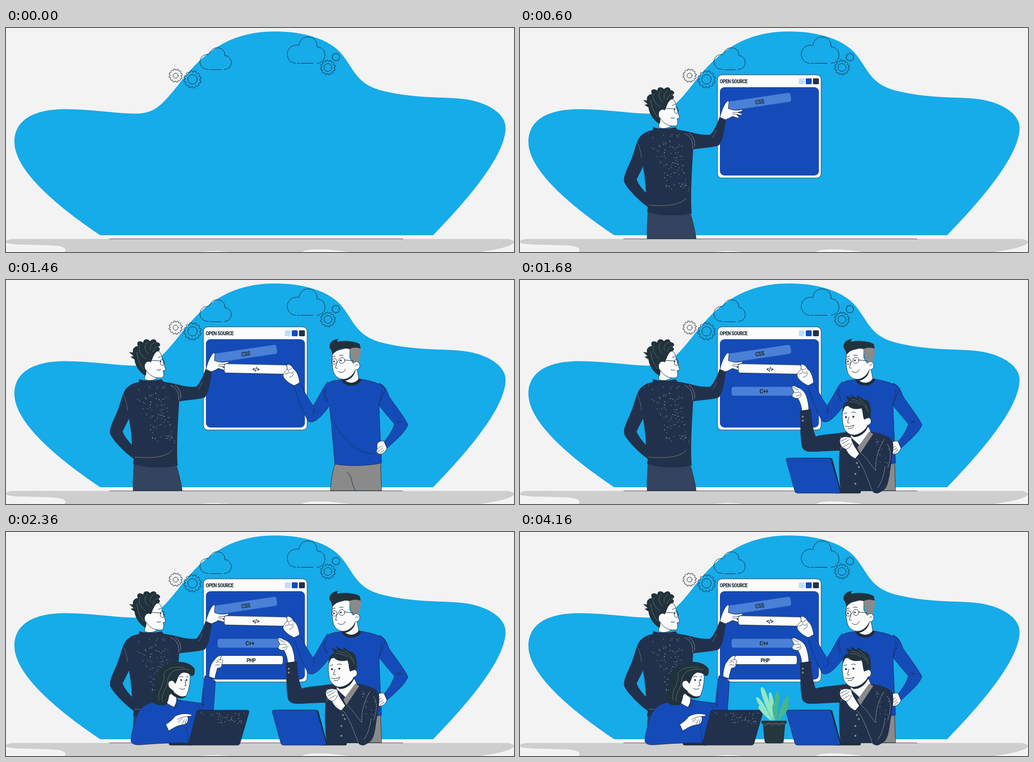
These frames come from a looping animation (1024 px wide and 454 px high, 5040 ms). An HTML page:

```html
<!DOCTYPE html>
<html lang="en">
<head>
<meta charset="utf-8">
<title>Open source team</title>
<style>
  html, body { margin: 0; width: 100%; height: 100%; overflow: hidden; background: #f3f3f3; }
  svg { display: block; width: 100vw; height: 100vh; }
  .step { opacity: 0; }
  .line, .thin { fill: none; stroke: #1f2d3b; stroke-width: 1; stroke-linecap: round; stroke-linejoin: round; }
  .thin { stroke-width: .8; }
  .skin, .card { fill: #fcfcfd; stroke: #1f2d3b; stroke-width: .9; stroke-linejoin: round; }
  .blue { fill: #144bb8; stroke: #1b2c52; stroke-width: .9; stroke-linejoin: round; }
  .navy { fill: #22314b; }
  .hair { fill: #21323c; }
  .ink { fill: #1f2d3b; }
  .grey { fill: #8a8a8a; }
  .bar { fill: #4a80d6; }
  .seam { fill: none; stroke: #c3c7c2; stroke-width: .8; stroke-dasharray: 3 1.2; }
  .speck { fill: none; stroke: #cdd2d0; stroke-width: .8; }
  .strand { fill: none; stroke: #8b9894; stroke-width: .6; }
  text { font-family: "Roboto Condensed", "Liberation Sans Narrow", Roboto, "Liberation Sans", sans-serif;
    font-weight: 700; font-stretch: 75%; letter-spacing: -.06em;
    fill: #22303c; dominant-baseline: central; text-anchor: middle; }
</style>
</head>
<body>
<svg viewBox="0 0 1024 454" preserveAspectRatio="none">
  <g id="scene">
    <path fill="#16abe9" d="M190 420C110 366 17 291 17 231C17 190 50 164.500 120 164.500C180 165 225 174 262 173.500C298 173 311 160 346 117C390 60 440 7 542 7C600 7 651 22 677 53C702 84 706 114 760 127.500C835 146 895 137 940 147C975 155 1007 175 1007 202C1007 255 940 338 861 420Z"/>
    <path fill="#cecece" d="M14 427.500H1010C1018 428 1024 431 1024 434C1020 443 990 449 955 454H690C645 447 606 447 597 454H448C430 451.500 410 451.500 390 454H118C125 446 112 441 88 440.500C50 439 0 440 0 434C0 430 6 428 14 427.500Z"/>
    <path class="line" style="stroke:#4c5658" d="M209 427.500H800"/>
    <path class="line" d="M407 84C398 84 391 77 391 69C391 59 399 52 408 54M410.500 52C413 44 418 40 426 40C435 40 442 47 441 56C449 56 454 63 454 70C454 78 448 84 440 84M410 84.500H412M414 84.500H434"/>
    <path class="line" d="M584 71.500C574 71 567 63 567 53C567 42 577 33 588 35M590 36C592 25 599 18 609 18C620 18 628 27 627 38C637 39 643 46 643 55C643 64 637 71 627 71.500M587 71.500H592M594 71.500H619"/>
  </g>

  <g class="step">
    <rect class="card" x="398" y="95" width="209" height="209" rx="9"/>
    <rect x="403" y="120" width="199.500" height="179" rx="9" fill="#144bb8"/>
    <rect x="562" y="102" width="12" height="12" rx="2" fill="#bfdffa"/>
    <rect x="576" y="102" width="12" height="12" rx="2" fill="#144bb8"/>
    <rect x="590.500" y="102" width="12" height="12" rx="2" class="navy"/>
    <text x="430.500" y="108" data-w="56">OPEN SOURCE</text>
  </g>

  <g class="step" id="left">
    <g transform="rotate(-8.500 483 149)">
      <rect class="bar" x="420" y="140" width="126.500" height="18.500" rx="4.500"/>
      <text x="483" y="149.500" data-w="18">CSS</text>
    </g>
    <path fill="#34445f" d="M258 368C256 390 255 410 256 427H355C353 410 348 392 343 374Z"/>
    <path class="line" d="M256 427H355C353 412 349 395 344 378"/>
    <path class="skin" d="M286 166L279 201C286 205 296 204 303 200L304 185Z"/>
    <path class="skin" d="M291 160C296 147 302 142 309 145C313 150 314 154 315 160L322 182L316.500 184L318 189C318 195 317 198 312 198.500C301 199 291 195 285 186L280 180C277 171 281 164 286 165Z"/>
    <path class="hair" d="M281 194C270 188 260 174 259 161L251 156L257 154L248 146L256 147C254 138 261 134 266 134C261 124 271 122 277 127C276 118 288 119 290 124C297 117 304 121 303 126C310 126 314 132 307 136C312 138 311 144 304 145C298 150 296 158 292 167C284 162 278 170 280 179C283 184 284 189 281 194Z"/>
    <path class="strand" d="M264 145C264 158 270 172 278 181M271 133C264 141 272 153 282 160M284 127C276 136 282 146 288 150M300 126C291 131 288 137 292 143M309 134C302 135 298 139 296 146"/>
    <path class="line" d="M293 163L311 164M304 182Q308 184 312 182M307 157L312 155"/>
    <ellipse class="line" cx="315" cy="167" rx="4" ry="6.500"/>
    <circle class="ink" cx="312" cy="165" r="1.300"/>
    <path class="navy" d="M268 201C281 205 298 205 314 201L317 206C345 210 365 219 384 216C392 206 398 194 402 181L415 186C412 205 410 225 401 238C385 243 365 243 349 246C347 285 343 335 346 376C320 382 280 381 256 373C257 366 258 365 257 362C239 350 214 323 210 312C207 300 219 281 226 262C234 240 236 222 248 215C254 210 261 208 268 207ZM248 281L235 307C239 317 247 327 254 334C253 316 251 298 248 281Z" fill-rule="evenodd"/>
    <path class="thin" d="M268 206C282 210 302 210 317 206"/>
    <path class="seam" style="stroke:#bfae95" d="M260 359C290 361 322 361 336 344"/>
    <path class="seam" d="M332 214C345 219 349 230 348 244M341 213C350 220 353 230 352 241"/>
    <path class="strand" d="M236 232C241 241 244 252 245 264M388 222Q393 216 396 206"/>
    <path class="skin" d="M403 181C406 169 410 158 416 150C419 146 422 148 421 152L420 163C428 167 437 168 447 165L449 168L439 171L448 174L446 177L436 175L442 181L439 182.500L428 179C422 183 418 184 414 186Z"/>
    <path class="thin" d="M439 171L429 171M436 175L428 174"/>
  </g>

  <g class="step">
    <g transform="rotate(1.200 503.500 180)">
      <rect class="card" x="440" y="171" width="127" height="18.500" rx="4.500"/>
      <text x="503.500" y="180" data-w="16">&lt;/&gt;</text>
    </g>
    <path class="grey" stroke="#1f2d3b" stroke-width=".9" d="M664 370C656 395 655 410 654 427H757L755 370Z"/>
    <path class="line" d="M687 389C694 395 696 401 697 408C698 416 702 420 704 427"/>
    <path class="blue" d="M752 209C765 214 768 225 772 236C785 255 803 278 810 293C806 308 785 325 768 341L763 327C774 314 780 302 783 292C773 280 762 267 750 252Z"/>
    <path class="blue" d="M676 202C660 203 648 206 645 215L652 256C657 300 660 340 663 373C690 378 730 377 757 371C756 340 753 300 752 252L764 222C756 208 735 205 716 201Z"/>
    <path class="blue" d="M649 206C640 216 632 235 619 255C608 240 600 222 592 208L580 214C590 245 600 270 609 286C618 292 632 283 652 255Z"/>
    <path fill="#144bb8" d="M649 208L645 235L650 257L668 250L665 208Z"/>
    <path class="thin" d="M644 219C642 231 646 240 649 247M641 222C639 232 643 239 645 246M757 221C758 231 754 240 753 252M621 258L619 273M619 262L627 268M786 285L797 287L788 290M662 289C679 325 706 351 742 352"/>
    <path class="skin" d="M748 333C750 327 757 325 762 327L768 341C765 349 758 354 753 353C748 352 745 347 748 343Z"/>
    <path class="thin" d="M748 343L757 336M749 348L760 340M753 352L762 344"/>
    <path class="skin" d="M592 208C590 196 587 185 580 181C576 173 570 169 566 172L567 181C559 187 557 193 560 198C566 206 574 211 581 214Z"/>
    <path class="thin" d="M567 181C570 184 575 181 576 178M569 184C573 191 576 190 579 185M571 197Q580 196 579 188M562 191L570 188"/>
    <path class="skin" d="M682 195L680 206C688 213 706 213 712 204L707 178Z"/>
    <path class="ink" d="M676 203L681 200C687 211 706 211 711 199L716 202C710 218 683 218 676 203Z"/>
    <path class="skin" d="M659 145C656 160 657 173 660 186C664 197 672 202 684 201C694 199 702 190 704 182C712 183 716 173 711 168C708 164 703 165 700 169L693 158V136Z"/>
    <path class="grey" d="M692 136H715C716 149 714 160 710 167C706 163 702 164 700 168C696 160 693 150 692 136Z"/>
    <path class="ink" d="M680 201.500C691 200 699 193 704 183C704 192 695 202 684 204Z"/>
    <path class="hair" d="M658 152C657 145 656 142 653 139C650 130 655 121 671 119C666 122 667 125 670 125C682 122 705 124 713 130L715 139C706 136 698 137 692 140C679 136 666 141 658 152Z"/>
    <circle class="line" cx="662" cy="165" r="5.500"/>
    <circle class="line" cx="677" cy="163" r="6"/>
    <path class="line" d="M683 162L700 164M658 156L664 154M672 153Q676 151 680 153M668 165L664 178L668 179M669 185C676 190 682 187 684 181"/>
    <circle class="ink" cx="661" cy="165" r="1.700"/>
    <circle class="ink" cx="675" cy="163" r="1.700"/>
    <path class="thin" d="M704 174Q709 169 710 173"/>
  </g>

  <g class="step" id="seated">
    <rect class="bar" x="426.500" y="216.500" width="126.500" height="18" rx="4.500"/>
    <text x="491.500" y="225" data-w="18">C++</text>
    <path class="skin" d="M568 265C567 254 564 246 560 240C552 240 547 236 549 232L552 227L548 218C549 212 555 215 560 218C570 221 576 230 578 238C581 248 582 256 582 263Z"/>
    <path class="thin" d="M552 227C558 231 560 224 565 229C568 233 567 237 560 240M550 217L562 224M557 235L564 233"/>
    <path class="navy" d="M564 265L587 262C587 280 590 301 596 317C615 312 635 312 650 309L706 307C735 312 750 318 752 331C754 347 749 365 745 395C742 412 740 425 726 430C722 434 714 433 710 428H646C643 395 642 370 644 346C625 346 605 348 590 348C576 349 569 344 568 336C564 315 566 290 564 265Z"/>
    <path class="skin" d="M668 308L703 298L707 308L686 337L666 318Z"/>
    <path class="grey" d="M704 307L712 312L686 351L680 340Z"/>
    <path class="skin" d="M652 256C648 276 650 295 655 304C662 313 670 316 677 314C690 311 698 303 701 294C709 293 710 282 703 279L694 282L690 252Z"/>
    <path class="ink" d="M664 312C678 318 693 308 701 295C701 307 684 320 672 318Z"/>
    <path class="hair" d="M651 267C649 253 653 248 662 246C660 242 660 238 656 236C663 236 666 238 668 240C669 237 666 235 666 233C673 235 677 238 679 239C681 237 681 235 680 233C688 238 692 243 697 243C706 247 708 260 707 280L704 278C699 278 697 281 694 283C690 276 692 267 688 260C675 264 664 260 660 253C655 256 653 261 651 267Z"/>
    <path class="strand" d="M664 247C672 245 680 249 688 253M668 242C680 243 692 249 698 261M682 240C693 246 700 256 702 268"/>
    <path class="line" d="M653 271L659 269M668 269Q673 266 677 269M663 278L660 289L664 290M656 296Q664 299 673 294Q671 303 661 301"/>
    <circle class="ink" cx="657" cy="278" r="2"/>
    <circle class="ink" cx="672" cy="277" r="2"/>
    <path class="skin" d="M645 323C648 316 662 317 668 320C668 328 676 340 684 352L676 362C666 358 660 350 657 343C648 340 643 332 645 323Z"/>
    <path class="thin" d="M646 327L659 321M648 333L663 324M652 338L664 331M657 343Q666 341 668 331"/>
    <path class="seam" d="M679 362C690 374 696 390 710 427M688 351C703 365 709 378 717 386M717 386C716 363 723 340 734 323M740 333C749 342 748 362 741 382M736 378C733 399 728 412 721 421M646 318C651 326 650 336 646 344"/>
    <g class="grey">
      <circle cx="570" cy="277" r="2"/><circle cx="570" cy="285" r="2"/>
      <circle cx="679" cy="371" r="2"/><circle cx="683" cy="379" r="2"/>
      <circle cx="676" cy="393" r="2"/><circle cx="676" cy="413" r="2"/>
    </g>
    <path class="ink" d="M636 428H687V430Q687 432.500 683 432.500H636ZM550 360.500H625Q629 360.500 630 364L647 427Q647 432 643 432H570Z"/>
    <path class="blue" d="M540 361H621Q626 361 627.500 366L645 427Q646 432 641 432H560Q555 432 554 428L537 366Q536 361 540 361Z"/>
  </g>

  <g class="step" id="woman">
    <rect class="card" x="432.500" y="250.500" width="126" height="18" rx="4.500"/>
    <text x="494" y="259.500" data-w="18">PHP</text>
    <path class="skin" d="M409 293C410 280 412 268 418 262C422 256 428 249 434 251L432 258C438 259 437 263 435 268C436 274 430 276 426 276C424 284 422 290 421 297Z"/>
    <path class="thin" d="M432 258L425 261M423 265Q429 260 432 265M422 270Q429 267 431 271"/>
    <path class="blue" d="M300 345C278 348 265 360 260 385C254 405 252 415 252 424C254 431 262 432 275 431C310 428 345 427 372 427L388 361H418C420 340 421 318 422 302L401 291C397 310 396 330 394 347C380 345 360 343 340 339Z"/>
    <path class="skin" d="M320 336L341 322L345 342L339 355C329 351 323 346 320 343Z"/>
    <path class="blue" d="M344 338L352 342L342 356Z"/>
    <path class="hair" d="M297 345C292 332 305 320 303 304C300 284 315 266 335 265C350 261 370 263 380 277L355 292L336 312C327 325 331 339 322 351C312 352 301 351 297 345Z"/>
    <path class="skin" d="M349 283C360 280 368 284 371 291C372 303 369 318 364 331C358 338 345 333 336 321L331 317C324 311 327 301 333 301C337 301 341 300 343 294Z"/>
    <path class="hair" d="M335 266C350 261 371 264 380 277C382 286 379 293 373 292C371 287 365 285 357 285C351 287 347 292 345 300L341 308C338 301 333 299 329 304L318 300Z"/>
    <path class="ink" d="M331 317C340 329 353 338 364 331C361 340 341 340 331 325Z"/>
    <path class="strand" d="M309 342C302 325 323 305 318 288C324 275 342 272 360 275M316 345C310 328 326 318 326 300C329 282 344 275 370 279"/>
    <path class="line" d="M349 294Q353 291 357 294M363 293L367 294M361 301L363 311L359 312M350 317Q355 321 361 317"/>
    <circle class="ink" cx="353" cy="300" r="1.800"/>
    <circle class="ink" cx="364" cy="300" r="1.800"/>
    <path class="thin" d="M388 347L400 351M384 351L392 358M363 394C366 405 367 416 367 427M322 390L328 403M396 356C398 345 399 335 399 323"/>
    <path class="skin" d="M322 390C330 385 336 380 340 374C350 368 362 367 374 370V373L366 374C369 380 366 388 360 390C352 391 345 393 340 396L328 403Z"/>
    <path class="thin" d="M346 380Q354 374 366 374M347 386L355 378M355 389L360 380M361 388L364 380"/>
    <path class="ink" d="M328 428H376V432.500H332Q328 432 328 428Z"/>
    <path class="navy" stroke="#182538" stroke-width=".8" d="M388 361H486Q491 361 489.500 366L472 427Q471 432 466 432H372Q367 432 368.500 427L384 365Q385 361 388 361Z"/>
  </g>

  <g class="step" id="plant">
    <g id="leaves"></g>
    <path fill="#26363d" stroke="#17252b" stroke-width=".8" d="M487 383H537V388H534L531 424Q531 428 527 428H498Q494 428 493.500 424L490 388H487Z"/>
    <path class="strand" d="M491 390Q494.500 395 498 390T505 390T512 390T519 390T526 390T533 390M491 388.500H533"/>
  </g>
</svg>
<script>
const LOOP = 5040;
const STARTS = [80, 600, 1120, 1680, 2360, 2840];
const $ = id => document.getElementById(id);

function add(parent, tag, attrs) {
  const el = document.createElementNS(parent.namespaceURI, tag);
  for (const k in attrs) el.setAttribute(k, attrs[k]);
  parent.append(el);
  return el;
}

function gear(cx, cy, r, hole, teeth) {
  const points = [], pitch = 2 * Math.PI / teeth;
  for (let i = 0; i < teeth; i++) {
    for (const [u, k] of [[0, .84], [.3, .84], [.4, 1], [.85, 1], [.95, .84]]) {
      const a = (i + u) * pitch;
      points.push((cx + r * k * Math.cos(a)).toFixed(1) + " " + (cy + r * k * Math.sin(a)).toFixed(1));
    }
  }
  add($("scene"), "path", { class: "line", d: "M" + points.join("L") + "Z" });
  if (hole) add($("scene"), "circle", { class: "line", cx, cy, r: hole });
}

let seed = 7;
const rnd = () => (seed = seed * 16807 % 2147483647) / 2147483647;

// Short dashes scattered between a top edge and a bottom edge.
function specks(id, n, [xa, xb, y0], [xc, xd, y1]) {
  let d = "";
  for (let i = 0; i < n; i++) {
    const u = rnd(), v = rnd();
    const l = xa + (xc - xa) * v, r = xb + (xd - xb) * v;
    d += `M${(l + (r - l) * u).toFixed(1)} ${(y0 + (y1 - y0) * v).toFixed(1)}l1.500 .6`;
  }
  add($(id), "path", { class: "speck", d });
}

function leaf(x, y, tx, ty, w, fill) {
  const dx = tx - x, dy = ty - y, len = Math.hypot(dx, dy);
  const nx = -dy / len * w, ny = dx / len * w;
  const at = (k, s) => `${x + dx * k + nx * s} ${y + dy * k + ny * s}`;
  add($("leaves"), "path", { fill, d: `M${x} ${y}C${at(.45, .9)} ${at(1, 1)} ${tx} ${ty}C${at(1, -1)} ${at(.45, -.9)} ${x} ${y}Z` });
}

gear(342, 96.5, 13.5, 5, 12);
gear(376, 104, 17.7, 9.5, 12);
gear(649, 80, 15, 8, 12);
gear(665, 59, 8, 0, 10);

specks("left", 105, [253, 322, 213], [298, 340, 330]);
specks("seated", 16, [716, 742, 322], [722, 744, 372]);
specks("woman", 38, [392, 480, 365], [415, 476, 388]);

const LIGHT = "#93e6c2", DARK = "#47b68c";
leaf(509, 384, 477, 335, 6, LIGHT);
leaf(508, 384, 481, 353, 5, LIGHT);
leaf(511, 384, 487, 314, 7, LIGHT);
leaf(513, 384, 504, 325, 6, LIGHT);
leaf(515, 384, 519, 322, 6, DARK);
leaf(518, 384, 541, 333, 6, DARK);
leaf(519, 384, 541, 350, 6, DARK);
leaf(515, 384, 514, 346, 8, DARK);

// Choose each label's type size from its natural width.
for (const t of document.querySelectorAll("text")) {
  t.style.fontSize = "20px";
  t.style.fontSize = Math.min(13, 20 * t.dataset.w / t.getComputedTextLength()) + "px";
}

document.querySelectorAll(".step").forEach((el, i) => {
  const offset = STARTS[i] / LOOP;
  const anim = el.animate(
    [{ opacity: 0 }, { opacity: 0, offset }, { opacity: 1, offset }, { opacity: 1 }],
    { duration: LOOP, iterations: Infinity });
  anim.startTime = document.timeline.currentTime;
});
</script>
</body>
</html>
```
